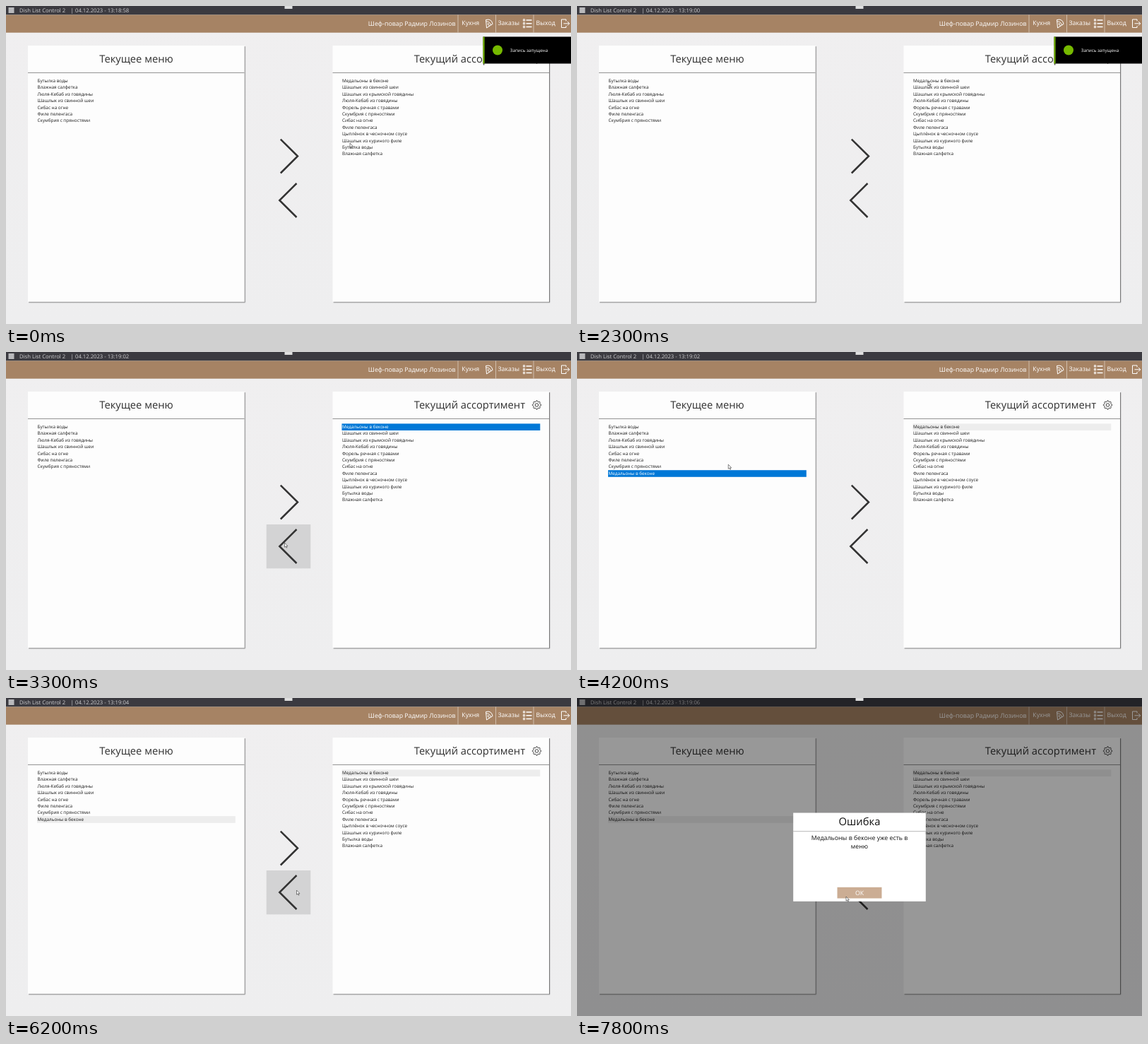
These frames come from a looping animation (800 by 450 pixels, 8 s). An HTML page:

```html
<!DOCTYPE html>
<html lang="ru">
<head>
<meta charset="utf-8">
<style>
html, body { margin: 0; width: 100%; height: 100%; overflow: hidden; background: #efeeef; }
svg { display: block; width: 100vw; height: 100vh; }
text { font-family: "Open Sans", "Noto Sans", sans-serif; text-rendering: geometricPrecision; white-space: pre; }
.line { fill: none; stroke: #fff; }
</style>
</head>
<body>
<svg viewBox="0 0 800 450" id="stage">
  <defs>
    <linearGradient id="bg" x2="0" y2="1">
      <stop stop-color="#f0eff0"/><stop offset="1" stop-color="#eeeeef"/>
    </linearGradient>
    <filter id="shadow" x="-5%" y="-5%" width="110%" height="110%">
      <feDropShadow dx="1.2" dy="1.2" stdDeviation=".7" flood-color="#000" flood-opacity=".5"/>
    </filter>
  </defs>
  <rect width="800" height="450" fill="url(#bg)"/>

  <rect width="800" height="12.5" fill="#3b3a40"/>
  <rect x="3.5" y="2" width="8" height="8" fill="#b9b9bc"/>
  <g font-size="7.7" fill="#cfcfd1">
    <text x="19" y="9">Dish List Control 2</text>
    <text x="91.3" y="9">|</text>
    <text x="98" y="9" id="clock"></text>
  </g>

  <rect y="12.5" width="800" height="25.2" fill="#a68364"/>
  <g font-size="8.8" fill="#fff">
    <text x="636.5" y="27.6" text-anchor="end">Шеф-повар Радмир Лозинов</text>
    <text x="645.3" y="27.2">Кухня</text>
    <text x="696.5" y="27.2">Заказы</text>
    <text x="750.5" y="27.2">Выход</text>
  </g>
  <path class="line" stroke-opacity=".6" stroke-width=".8" d="M640 12.5v25M693.5 12.5v25M747 12.5v25"/>
  <g class="line" stroke-width="1">
    <path d="M679.5 19.5q8-2 9.5 6l-8.500 5.500zM680 22q5-.5 6.500 5"/>
    <circle cx="682.800" cy="25.500" r=".8"/><circle cx="684" cy="28" r=".5"/>
    <path d="M736.500 20h8M736.500 24.800h8M736.500 29.600h8" stroke-width="1.500"/>
    <path d="M732.500 18.800h2v2.300h-2zM732.500 23.600h2v2.300h-2zM732.500 28.400h2v2.300h-2z"/>
    <path d="M793 21.500v-2.500h-6.500v11.500h6.500v-2.500M789.500 24.800h8M795 22l2.800 2.800l-2.800 2.800"/>
  </g>

  <g fill="#fdfdfd" filter="url(#shadow)">
    <rect x="31" y="56" width="306.500" height="362.500"/>
    <rect x="462.500" y="56" width="306.500" height="362.500"/>
  </g>
  <path d="M31 94.500h306.500M462.500 94.500h306.500" stroke="#929292"/>
  <g font-size="14.7" fill="#303030">
    <text x="184.500" y="80" text-anchor="middle">Текущее меню</text>
    <text x="735" y="80" text-anchor="end">Текущий ассортимент</text>
  </g>
  <g fill="none" stroke="#444" stroke-width="1">
    <path id="gear" stroke-linejoin="round"/><circle cx="751.500" cy="75" r="2.300"/>
  </g>

  <rect id="hover" x="368.700" y="244" width="62.600" height="62.300" fill="#d3d3d4"/>
  <path d="M388.800 188.700L413 212.500L388.800 236.500M411.500 251L387.300 275L411.500 299" fill="none" stroke="#333" stroke-width="2.500"/>

  <rect id="leftMark" x="44" y="167.200" width="280.800" height="9.600"/>
  <rect id="rightMark" x="475.500" y="101.400" width="280.800" height="9.600"/>
  <g id="lists" font-size="6.38" fill="#1c1c1c"></g>

  <g id="notice">
    <rect x="675.500" y="43.500" width="125" height="38" fill="#000"/>
    <rect x="675.500" y="43.500" width="2" height="38" fill="#76b900"/>
    <circle cx="696" cy="62.500" r="7" fill="#76b900"/>
    <text x="713.800" y="65.300" font-size="6.25" fill="#fff">Запись запущена</text>
  </g>

  <g id="modal">
    <rect width="800" height="450" opacity=".4"/>
    <rect x="306.200" y="162.500" width="187.600" height="125.300" fill="#fff"/>
    <path d="M306.200 188.700h187.600" stroke="#b0b0b0" stroke-width=".9"/>
    <g text-anchor="middle" fill="#111">
      <text x="400" y="180.200" font-size="14.8">Ошибка</text>
      <g font-size="8.8">
        <text x="400" y="201.300">Медальоны в беконе уже есть в</text>
        <text x="400" y="212.700">меню</text>
        <rect x="368.500" y="267.800" width="63" height="15.700" fill="#cbad94"/>
        <text x="400" y="278.600" fill="#fff">ОК</text>
      </g>
    </g>
  </g>

  <rect x="394.500" width="11" height="4" fill="#dedede"/>
  <path id="cursor" d="M0 0v6.200l1.500-1.300l1 2.200l1-.4l-1-2.100h1.900z" fill="#fff" stroke="#333" stroke-width=".6"/>
</svg>
<script>
const LOOP = 8000, STEP = 100;
const BLUE = '#0078d7', GREY = '#ededed';
const $ = id => document.getElementById(id);

const dish = 'Медальоны в беконе';
const menu = ['Бутылка воды', 'Влажная салфетка', 'Люля-Кебаб из говядины', 'Шашлык из свинной шеи',
  'Сибас на огне', 'Филе пеленгаса', 'Скумбрия с пряностями', dish];
const stock = [dish, 'Шашлык из свинной шеи', 'Шашлык из крымской говядины', 'Люля-Кебаб из говядины',
  'Форель речная с травами', 'Скумбрия с пряностями', 'Сибас на огне', 'Филе пеленгаса',
  'Цыплёнок в чесночном соусе', 'Шашлык из куриного филе', 'Бутылка воды', 'Влажная салфетка'];

function addList(items, x) {
  return items.map((item, i) => {
    const row = document.createElementNS('http://www.w3.org/2000/svg', 'text');
    row.setAttribute('x', x);
    row.setAttribute('y', 108 + i * 9.4);
    row.textContent = item;
    $('lists').append(row);
    return row;
  });
}
const addedRow = addList(menu, 44.5).pop();
const pickedRow = addList(stock, 476)[0];

const teeth = [];
for (let i = 0; i < 32; i++) {
  const angle = (i - .5) * Math.PI / 16, radius = i % 4 < 2 ? 6.2 : 4.8;
  teeth.push([751.5 + radius * Math.cos(angle), 75 + radius * Math.sin(angle)]);
}
$('gear').setAttribute('d', 'M' + teeth.join('L') + 'z');

// Pointer stops: time, x, y
const stops = [
  [0, 487, 194], [400, 410, 243], [900, 194, 166], [1400, 84, 155], [1800, 146, 166],
  [2300, 497, 107], [2700, 497, 106], [3200, 394.5, 270], [3600, 394.5, 270],
  [4000, 160, 169], [4100, 160, 169], [4500, 507, 106], [5200, 511, 104], [5500, 511, 104],
  [6000, 411.5, 272], [6700, 411.5, 272], [7200, 494, 277], [7400, 488, 285], [7800, 381, 281]
];
// Clock readings: time, seconds past 13:18:00
const ticks = [[0, 58], [500, 59], [1500, 60], [2800, 61], [3300, 62], [4300, 63], [5300, 64], [6300, 65], [7300, 66]];

const lastBefore = (list, t) => list.findLastIndex(item => item[0] <= t);

function pointerAt(t) {
  const i = lastBefore(stops, t), [t0, x0, y0] = stops[i], [t1, x1, y1] = stops[i + 1] || [t0 + 1, x0, y0];
  const k = (t - t0) / (t1 - t0), e = k * k * (3 - 2 * k);
  return [x0 + (x1 - x0) * e, y0 + (y1 - y0) * e];
}

const show = (el, on) => el.setAttribute('visibility', on ? 'visible' : 'hidden');

function mark(bar, row, color) {
  bar.setAttribute('fill', color);
  row.setAttribute('fill', color === BLUE ? '#fff' : '#1c1c1c');
}

function render(t) {
  const [x, y] = pointerAt(t);
  $('cursor').setAttribute('transform', `translate(${x} ${y})`);

  const s = ticks[lastBefore(ticks, t)][1];
  $('clock').textContent = `04.12.2023 - 13:${18 + Math.floor(s / 60)}:${String(s % 60).padStart(2, '0')}`;

  const modal = t >= 6300;
  show($('modal'), modal);
  show($('notice'), t < 3000);
  show($('hover'), !modal && x > 368 && x < 432 && y > 244 && y < 306.5);
  show(addedRow, t >= 3500);

  mark($('leftMark'), addedRow, t < 4100 ? 'none' : t < 5300 ? BLUE : GREY);
  const picked = t < 3500 || (t >= 5300 && t < 6200);
  mark($('rightMark'), pickedRow, t < 2700 ? 'none' : picked ? BLUE : GREY);
}

const start = performance.now();
function frame() {
  const t = (performance.now() - start) % LOOP;
  render(Math.floor(t / STEP) * STEP);
  requestAnimationFrame(frame);
}
frame();
</script>
</body>
</html>
```
